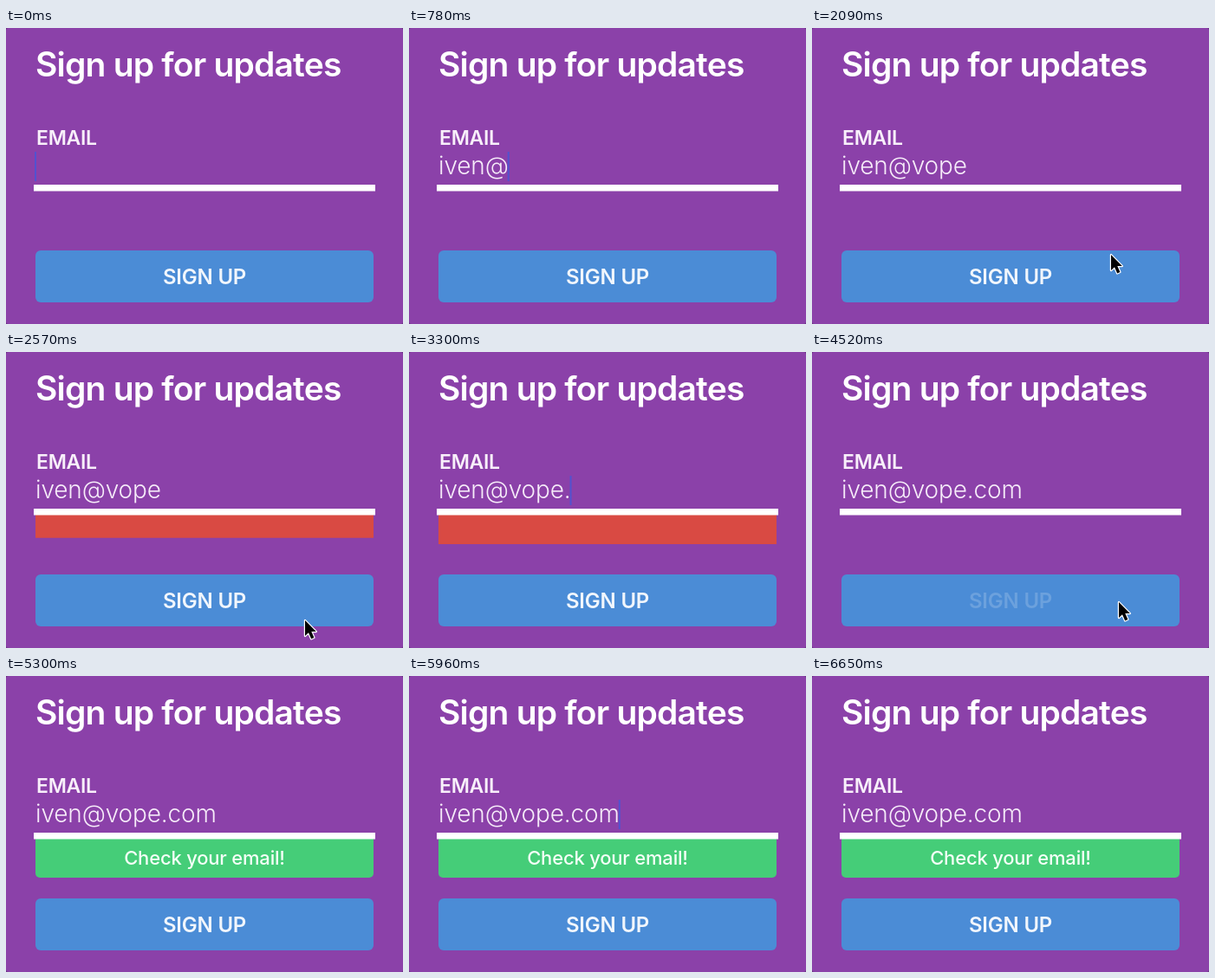
Recreate the animation shown at these times as an HTML page with a canvas. Size 458x342 px, loop 6.69 s.

```html
<!DOCTYPE html>
<html lang="en">
<head>
<meta charset="utf-8">
<title>Sign up for updates</title>
<style>
html, body { margin: 0; width: 100%; height: 100%; overflow: hidden; background: #8b41a9; }
canvas { display: block; width: 458px; height: 342px; }
</style>
</head>
<body>
<canvas id="stage" width="458" height="342"></canvas>
<script>
const ctx = document.getElementById('stage').getContext('2d');
const LOOP = 6690;
const EMAIL = 'iven@vope.com';
const KEYS = [130, 260, 390, 510, 700, 930, 1050, 1170, 1300, 3200, 3400, 3530, 3670];

const clamp = v => Math.min(1, Math.max(0, v));
const ease = v => v * v * (3 - 2 * v);
const ramp = (t, a, b) => ease(clamp((t - a) / (b - a)));
const mix = (a, b, k) => a + (b - a) * k;

function text(str, x, y, size, weight, color, spacing = 0, align = 'left') {
  ctx.font = `${weight} ${size}px Inter, sans-serif`;
  ctx.letterSpacing = spacing + 'px';
  ctx.textAlign = align;
  ctx.fillStyle = color;
  ctx.fillText(str, x, y);
  return ctx.measureText(str).width;
}

function box(x, y, w, h, color, radii = 0) {
  ctx.fillStyle = color;
  ctx.beginPath();
  ctx.roundRect(x, y, w, h, radii);
  ctx.fill();
}

function field(t) {
  const typed = KEYS.filter(k => k <= t);
  const width = text(EMAIL.slice(0, typed.length), 34, 169, 28, 300, '#f6ecf9', -0.15);
  const focused = t < 2050 || (t > 2700 && t < 4250) || t > 5450;
  const since = t - (typed.length ? typed[typed.length - 1] : 0);
  const lit = t > 5450 ? (t - 5450) % 1000 > 500 : since % 1000 < 500;
  if (focused && lit) box(33 + width, 143, 2, 34, '#5352cf');
}

function panel(height, color, label) {
  if (height < 0.5) return;
  ctx.save();
  ctx.beginPath();
  ctx.rect(34, 188, 390, height);
  ctx.clip();
  box(34, 188, 390, 45, color, [0, 0, 5, 5]);
  if (label) text(label, 229, 218, 22, 500, '#f4fff7', -0.2, 'center');
  ctx.restore();
}

function button(t) {
  box(34, 257, 390, 60, '#4b8cd6', 6);
  const busy = ramp(t, 2150, 2250) - ramp(t, 2420, 2540)
    + ramp(t, 4300, 4420) - ramp(t, 4720, 4840);
  ctx.globalAlpha = 1 - 0.8 * busy;
  text('SIGN UP', 229, 296, 24, 600, '#f1f6fc', -0.2, 'center');
  ctx.globalAlpha = 1;
}

function pointer(x, y) {
  ctx.save();
  ctx.translate(x, y);
  ctx.beginPath();
  [[0, 0], [0, 18], [4, 14.3], [7.2, 21.5], [10.4, 20], [7.3, 13], [12.8, 13]]
    .forEach(p => ctx.lineTo(...p));
  ctx.closePath();
  ctx.lineJoin = 'round';
  ctx.lineWidth = 2.4;
  ctx.strokeStyle = '#fff';
  ctx.stroke();
  ctx.fillStyle = '#000';
  ctx.fill();
  ctx.restore();
}

function mouse(t) {
  if (t > 1500 && t < 2750) {
    const inward = ramp(t, 1500, 2020), out = ramp(t, 2350, 2750);
    pointer(mix(325, 345, inward), mix(345, 262, inward) + 83 * out);
  } else if (t > 3780 && t < 4850) {
    const inward = ramp(t, 3780, 4220);
    pointer(mix(338, 354, inward), mix(345, 289, inward));
  }
}

function draw(t) {
  box(0, 0, 458, 342, '#683080');
  box(0, 0, 458, 342, '#8b41a9', 3);
  text('Sign up for updates', 34, 56, 39, 600, '#fff', -0.8);
  text('EMAIL', 35, 135, 23, 600, '#f8effa', -0.3);
  field(t);
  panel(45 * (ramp(t, 2430, 2680) - ramp(t, 3220, 3470)), '#d94a43');
  panel(45 * ramp(t, 4720, 4970), '#45cd78', 'Check your email!');
  box(32, 181, 394, 7.5, '#fff');
  button(t);
  mouse(t);
}

const start = performance.now();
function tick() {
  draw((performance.now() - start) % LOOP);
  requestAnimationFrame(tick);
}
tick();
</script>
</body>
</html>
```
